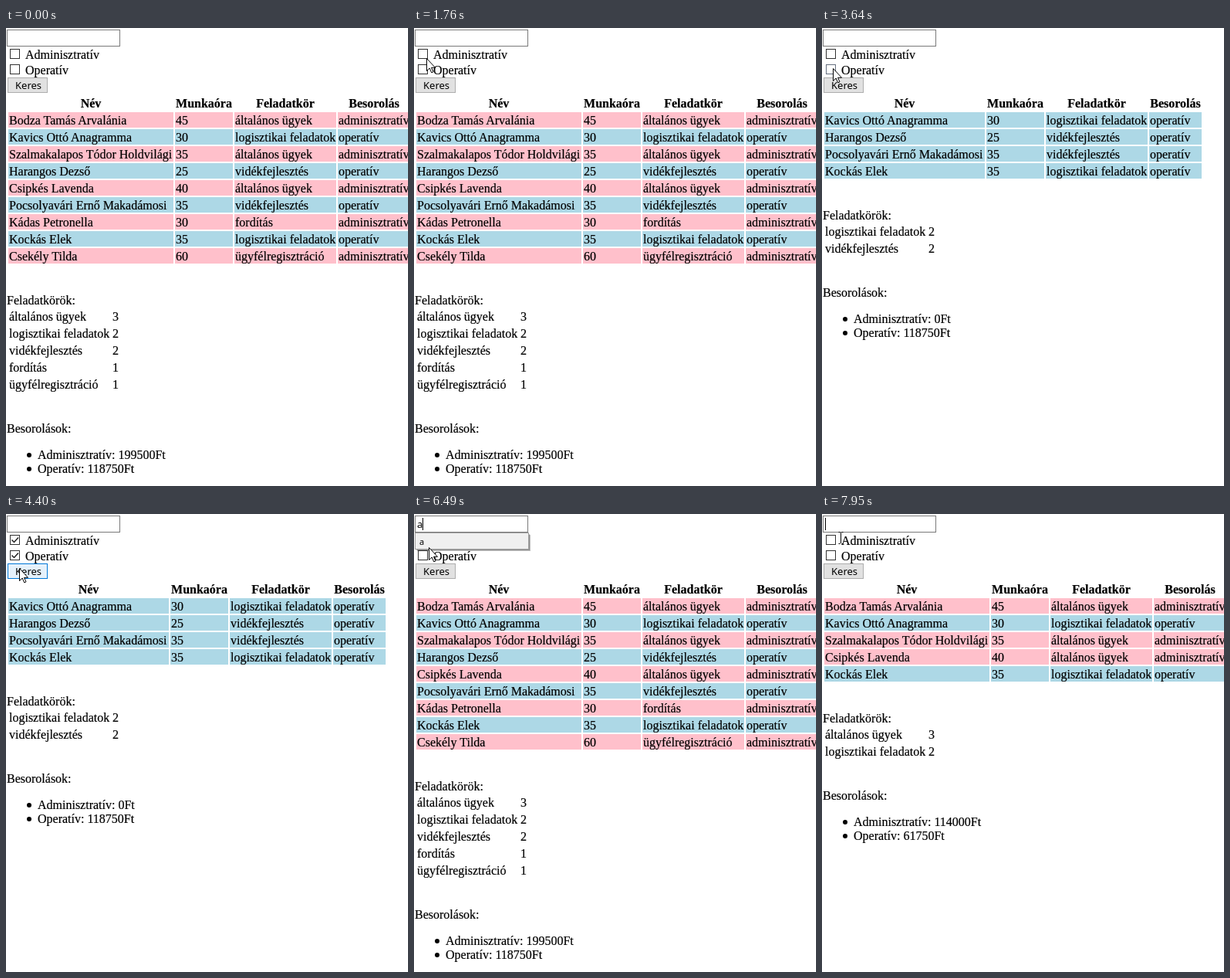
Animation, 521 px wide and 593 px high, one loop 8000 ms. Source, as an HTML page:

```html
<!DOCTYPE html>
<html lang="hu">
<head>
<meta charset="utf-8">
<style>
html, body { margin: 0; width: 100%; height: 100%; overflow: hidden; background: #fff; }
svg { display: block; width: 521px; height: 593px; font: 16px "Liberation Serif", "Times New Roman", serif; }
text { stroke: #000; stroke-width: .2px; }
.ui { font: 13px "Noto Sans", "Open Sans", sans-serif; stroke: none; }
.head { font-weight: bold; text-anchor: middle; }
</style>
</head>
<body>
<svg viewBox="0 0 521 593">
  <g id="page"></g>
  <rect x="1.5" y="2.5" width="146" height="21" fill="#fff" stroke="#7a7a7a"/>
  <text id="typed" class="ui" x="4" y="18">a</text>
  <path id="caret" stroke="#000"/>
  <g id="boxes" fill="#fff">
    <rect x="5.5" y="27.5" width="12" height="12"/>
    <rect x="5.5" y="47.5" width="12" height="12"/>
  </g>
  <g fill="none" stroke="#222" stroke-width="1.5">
    <path id="adminTick" d="M7.5 33.5l3 3 5.5-6"/>
    <path id="operTick" d="M7.5 53.5l3 3 5.5-6"/>
  </g>
  <text x="25" y="40">Adminisztratív</text>
  <text x="25" y="60">Operatív</text>
  <rect id="button" x="2.5" y="64.5" width="51" height="19"/>
  <text class="ui" x="12" y="79">Keres</text>
  <g id="menu">
    <rect x="4" y="27" width="147" height="21" opacity=".25"/>
    <rect x="3" y="26" width="147" height="21" opacity=".25"/>
    <rect x="1.5" y="24.5" width="147" height="21" fill="#f0f0f0" stroke="#a0a0a0"/>
    <text class="ui" x="7" y="40" style="font-size:11px">a</text>
  </g>
  <circle id="glow" cx="-1" r="12" fill="#ece420" opacity=".65"/>
  <path id="arrow" d="M.5.5v16l3.700-3.500 2.500 5.800 2.300-1-2.500-5.500h5z" fill="#fff" stroke="#000"/>
  <path id="beam" d="M-2.500-7.500h2M1.500-7.500h2M.5-7v14M-2.500 7.500h2M1.500 7.500h2" stroke="#000"/>
</svg>
<script>
const $ = id => document.getElementById(id);
const LOOP = 8000, MOVE = 220, PRESS = 80, TYPE_AT = 6130;
const ADMIN = 'adminisztratív', OPER = 'operatív';
const GENERAL = 'általános ügyek', LOGI = 'logisztikai feladatok',
  RURAL = 'vidékfejlesztés', TRANS = 'fordítás', REG = 'ügyfélregisztráció';
const titles = ['Név', 'Munkaóra', 'Feladatkör', 'Besorolás'];
const people = [
  ['Bodza Tamás Arvalánia', 45, GENERAL, ADMIN],
  ['Kavics Ottó Anagramma', 30, LOGI, OPER],
  ['Szalmakalapos Tódor Holdvilági', 35, GENERAL, ADMIN],
  ['Harangos Dezső', 25, RURAL, OPER],
  ['Csipkés Lavenda', 40, GENERAL, ADMIN],
  ['Pocsolyavári Ernő Makadámosi', 35, RURAL, OPER],
  ['Kádas Petronella', 30, TRANS, ADMIN],
  ['Kockás Elek', 35, LOGI, OPER],
  ['Csekély Tilda', 60, REG, ADMIN]
];

// where the pointer rests
const spots = {
  start: [215, 230], field: [22, 14], label: [24, 31],
  admin: [16, 35], oper: [14, 52], button: [17, 72]
};
// arrival time, spot, wait before the click (none: no click)
const steps = [
  [250, 'field'], [830, 'button', 200],
  [1807, 'admin', 60], [2240, 'button', 100],
  [2810, 'oper', 180], [3290, 'button', 50],
  [3640, 'oper', 190], [4130, 'admin', 0], [4430, 'button', 0],
  [4730, 'button', 270], [5460, 'field', 40],
  [6600, 'button', 320], [7380, 'label'], [7700, 'field', 20], [7950, 'label']
].map(([at, spot, wait]) => ({ at, spot, press: at + wait }));

const show = (id, on) => $(id).style.display = on ? '' : 'none';
const text = (x, y, s, cls = '') => `<text x="${x}" y="${y}" class="${cls}">${s}</text>`;

// replay every click finished by time t
function formAt(t) {
  const form = { admin: false, oper: false, focus: '', rows: people };
  for (const { spot, press } of steps) {
    if (!(press + PRESS <= t)) continue;
    form.focus = spot;
    if (spot === 'admin' || spot === 'oper') form[spot] = true;
    if (spot !== 'button') continue;
    const word = press > TYPE_AT ? 'a' : '';
    const wanted = form.admin === form.oper ? [ADMIN, OPER] : [form.admin ? ADMIN : OPER];
    form.rows = people.filter(p => wanted.includes(p[3]) && p[2].includes(word));
    form.admin = form.oper = false;
  }
  form.typed = form.focus === 'field' && t >= TYPE_AT && t < TYPE_AT + 1000;
  return form;
}

function pageMarkup(rows) {
  const has = (col, value) => rows.some(r => r[col] === value);
  const widths = [rows.includes(people[2]) ? 214 : 208, 75, has(2, LOGI) ? 132 : 118, has(3, ADMIN) ? 94 : 68];
  const counts = new Map();
  const pay = { [ADMIN]: 0, [OPER]: 0 };
  let out = '', x = 3;
  widths.forEach((w, c) => {
    out += text(x + w / 2, 103, titles[c], 'head');
    rows.forEach((r, i) => {
      const y = 109 + 22 * i;
      out += `<rect x="${x}" y="${y}" width="${w}" height="20" fill="${r[3] === ADMIN ? 'pink' : 'lightblue'}"/>`
        + text(x + 1, y + 16, r[c]);
    });
    x += w + 2;
  });
  for (const [, hours, job, rank] of rows) {
    counts.set(job, (counts.get(job) || 0) + 1);
    pay[rank] += hours * 950;
  }
  let y = 160 + 22 * rows.length;
  out += text(1, y, 'Feladatkörök:');
  [...counts].forEach(([job, n], i) => {
    const base = y + 21 + 22 * i;
    out += text(4, base, job) + text(has(2, LOGI) ? 138 : 124, base, n);
  });
  y += 56 + 22 * counts.size;
  out += text(1, y, 'Besorolások:');
  [['Adminisztratív', ADMIN], ['Operatív', OPER]].forEach(([label, rank], i) => {
    const base = y + 34 + 18 * i;
    out += `<circle cx="30" cy="${base - 5}" r="3"/>` + text(41, base, `${label}: ${pay[rank]}Ft`);
  });
  return out;
}

function pointerAt(t) {
  const i = steps.findLastIndex(s => s.at - MOVE <= t);
  if (i < 0) return [-50, -50];
  const from = spots[i ? steps[i - 1].spot : 'start'], to = spots[steps[i].spot];
  const u = Math.min(1, (t - steps[i].at + MOVE) / MOVE);
  const ease = u * u * (3 - 2 * u);
  return from.map((a, n) => Math.round(a + (to[n] - a) * ease));
}

let shown;
function draw(now) {
  const t = now % LOOP;
  const form = formAt(t);
  const markup = pageMarkup(form.rows);
  if (markup !== shown) $('page').innerHTML = shown = markup;

  const [x, y] = pointerAt(t);
  const inside = (l, top, r, b) => x >= l && x < r && y >= top && y < b;
  const down = steps.some(s => t >= s.press && t < s.press + PRESS);

  show('typed', form.typed);
  show('menu', form.typed);
  show('caret', form.focus === 'field');
  $('caret').setAttribute('d', `M${form.typed ? 11.5 : 4.5} 5v16`);
  show('adminTick', form.admin);
  show('operTick', form.oper);
  [...$('boxes').children].forEach((box, i) => {
    box.setAttribute('stroke', inside(5, 27 + 20 * i, 18, 39 + 20 * i) ? '#667080' : '#333');
  });

  const hot = inside(2, 64, 54, 84);
  const [fill, line] = !hot ? ['#e1e1e1', '#adadad'] : down ? ['#cce4f7', '#005499'] : ['#e5f1fb', '#0078d7'];
  $('button').setAttribute('fill', fill);
  $('button').setAttribute('stroke', line);

  const beam = !form.typed && (inside(1, 2, 148, 24) || inside(20, 24, 122, 44));
  show('arrow', !beam);
  show('beam', beam);
  show('glow', down);
  for (const id of ['arrow', 'beam', 'glow']) $(id).setAttribute('transform', `translate(${x} ${y})`);
}

function tick(now) {
  draw(now);
  requestAnimationFrame(tick);
}
draw(0);
requestAnimationFrame(tick);
</script>
</body>
</html>
```
